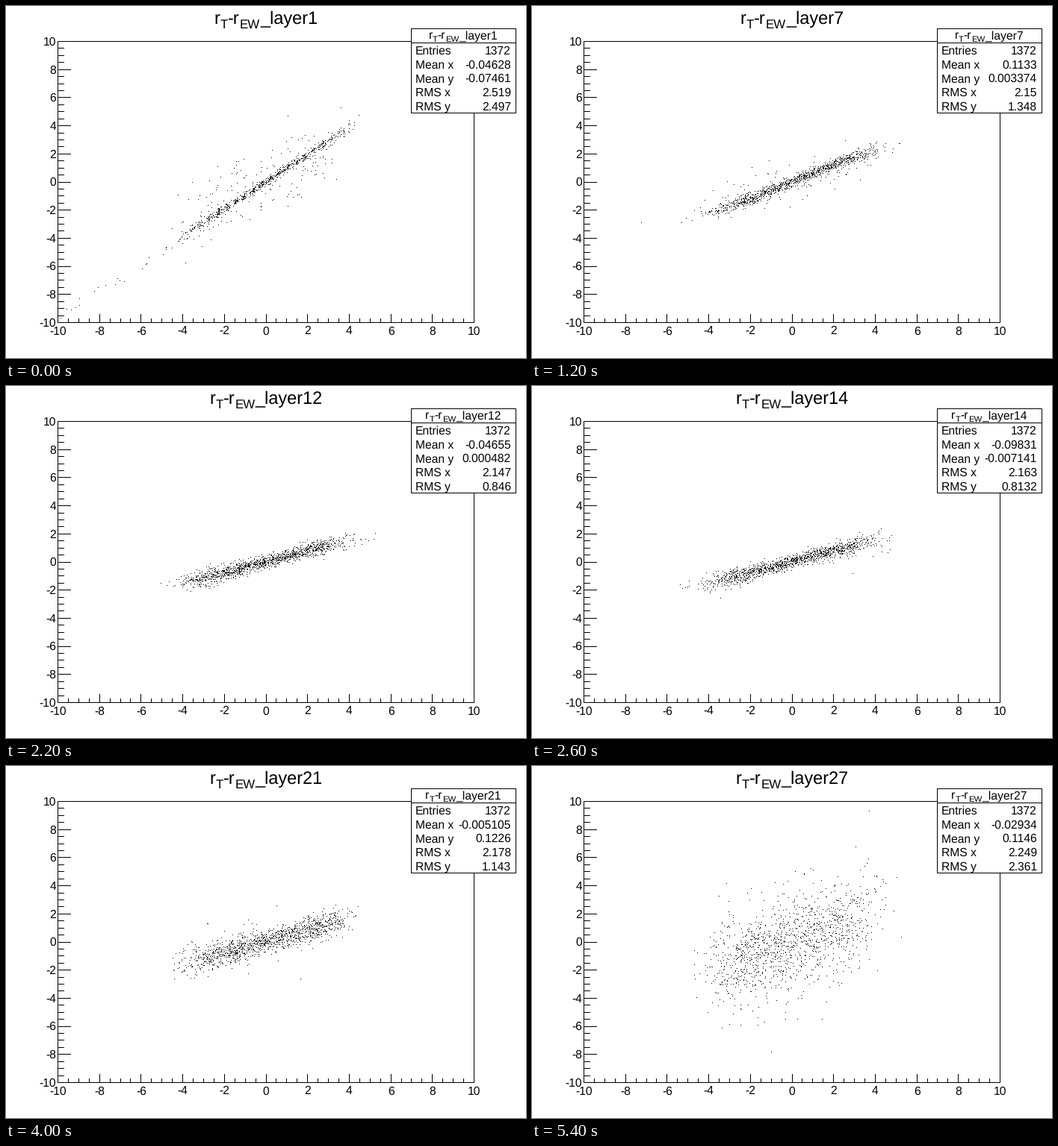
A matplotlib script for the animation above (5.5 s loop, 696 by 472 pixels).

```python
import matplotlib.pyplot as plt
import numpy as np
from matplotlib.animation import FuncAnimation
from matplotlib.patches import Rectangle
from matplotlib.textpath import TextPath

W, H, DPI = 696, 472, 64
PT = 72 / DPI  # points per pixel
FONT = "Liberation Sans"
LEFT, RIGHT, TOP, BOTTOM = 69.5, 626.5, 47.5, 424.5
LAST = 27

plt.rcParams["font.family"] = FONT
plt.rcParams["text.hinting"] = "none"
fig = plt.figure(figsize=(W / DPI, H / DPI), dpi=DPI, facecolor="white")
ax = fig.add_axes([0, 0, 1, 1])
ax.set(xlim=(0, W), ylim=(H, 0))
ax.axis("off")

# Readings shown in the statistics box: layer, mean x, mean y, RMS x, RMS y.
NAMES = ["Mean x", "Mean y", "RMS x", "RMS y"]
READINGS = np.array([
    (1, -0.04628, -0.07461, 2.519, 2.497),
    (7, 0.1133, 0.003374, 2.15, 1.348),
    (10, 0.005208, 0.008105, 2.132, 0.8789),
    (14, -0.09831, -0.007141, 2.163, 0.8132),
    (18, 0.02745, 0.08871, 2.193, 0.8772),
    (24, -0.03766, 0.1564, 2.162, 1.409),
    (27, -0.02934, 0.1146, 2.249, 2.361),
])


def readings(layer):
    keys, *columns = READINGS.T
    return [np.interp(layer, keys, c) for c in columns]


def px(x):
    return LEFT + (x + 10) * (RIGHT - LEFT) / 20


def py(y):
    return BOTTOM - (y + 10) * (BOTTOM - TOP) / 20


def line(xs, ys, z=2):
    """One-pixel line through pixel centres."""
    ax.plot(np.floor(xs) + 0.5, np.floor(ys) + 0.5, color="black", lw=PT,
            solid_capstyle="projecting", solid_joinstyle="miter",
            snap=False, zorder=z)


def text(x, y, s, size=15.6, ha="left"):
    return ax.text(x, y, s, fontsize=size * PT, ha=ha, va="baseline", zorder=5)


def advance(s, size):
    def edge(t):
        return TextPath((0, 0), t, size=100, prop={"family": FONT}).get_extents().x1
    return (edge(s + "l") - edge("l")) * size / 100


def heading(cx, y, size, drop, layer):
    """Centred heading with two subscripts."""
    small = 0.72 * size
    runs = [("r", size, 0), ("T", small, drop), ("-r", size, 0),
            ("EW", small, drop), (f"_layer{layer}", size, 0)]
    widths = [advance(s, z) for s, z, _ in runs]
    starts = cx - sum(widths) / 2 + np.cumsum([0] + widths[:-1])
    return [text(x, y + dy, s, z) for x, (s, z, dy) in zip(starts, runs)]


def cloud(layer, mean):
    """Band of points: steep and thin at first, flat, then blown apart."""
    rng = np.random.default_rng(100 + layer)
    early = np.exp(-((layer - 1) / 6) ** 2)
    late = np.exp((layer - LAST) / 3.5)

    n = int(1300 - 450 * early)
    x = mean + rng.uniform(-3.4, 3.4, n) + rng.normal(0, 0.75, n)
    x += 0.04 * early * np.sin(2 * np.pi * x / 0.42)
    far_left = rng.random(n) < 0.03 * early**3
    x = np.where(far_left, rng.uniform(-10, -4.5, n), x)

    slope = 0.40 + 0.57 * early + 0.1 * late
    bend = 0.008 * (1 - early) * (1 - late)
    fan = 0.5 * (1 - late) * (0.2 * np.abs(x) - 0.4)
    sigma = (0.25 - 0.08 * early + 1.25 * late) * (1 + fan)
    stray = (rng.random(n) < 0.24 * early + 0.15 * late) & ~far_left
    sigma = np.where(stray, 0.5 + 0.7 * early + 2.6 * late, sigma)
    y = slope * x * (1 - bend * x**2 - 0.25 * stray) + rng.normal(0, 1, n) * sigma

    inside = (np.abs(x) < 9.95) & (np.abs(y) < 9.95)
    return px(x[inside]), py(y[inside])


def build(layer):
    values = readings(layer)
    parts = ax.plot(*cloud(layer, values[0]), ",", color="black", zorder=1)
    parts += heading(348, 23.6, 23.5, 6, layer)
    parts += heading(612, 44.5, 15.8, 4, layer)
    for i, v in enumerate(values, 1):
        parts.append(text(676, 64.7 + 18.8 * i, f"{v:.4g}", ha="right"))
    return parts


# Axes
line([LEFT, RIGHT, RIGHT, LEFT, LEFT], [TOP, TOP, BOTTOM, BOTTOM, TOP])
for k in range(41):
    v = -10 + k / 2
    major = k % 4 == 0
    line([px(v)] * 2, [BOTTOM, BOTTOM - (11 if major else 5)])
    line([LEFT, LEFT + (17 if major else 8)], [py(v)] * 2)
    if major:
        text(px(v), 440.5, f"{v:.0f}", ha="center")
        text(67, py(v) + 5.2, f"{v:.0f}", ha="right")

# Statistics box
ax.add_patch(Rectangle((542, 30), 141, 114, fc="white", ec="none", zorder=3))
line([542, 682, 682, 542, 542], [30, 30, 143, 143, 30], z=4)
line([542, 682], [49, 49], z=4)
for i, name in enumerate(["Entries", *NAMES]):
    text(548.2, 64.7 + 18.8 * i, name)
text(676, 64.7, "1372", ha="right")

layers = [build(n) for n in range(1, LAST + 1)]


def update(i):
    shown = min(i // 2, LAST - 1)
    for k, parts in enumerate(layers):
        for part in parts:
            part.set_visible(k == shown)
    return layers[shown]


update(0)
anim = FuncAnimation(fig, update, frames=55, interval=100, repeat=True,
                     repeat_delay=0, blit=False)
plt.show()
```
